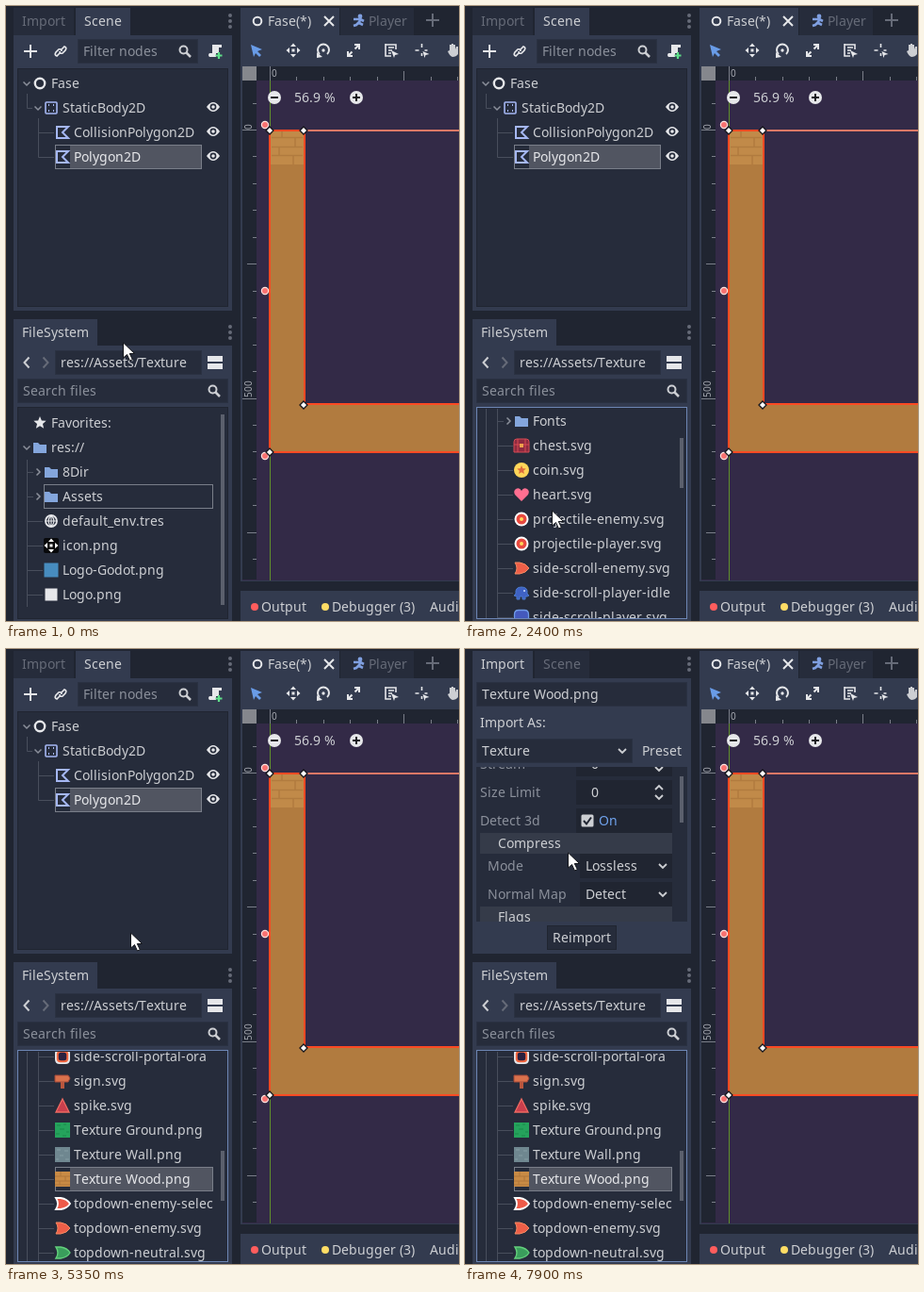
An HTML page with a canvas for the animation above (8000 ms loop, 481 px wide and 652 px high).

```html
<!DOCTYPE html>
<html lang="en">
<head>
<meta charset="utf-8">
<title>Editor: texture import</title>
<style>
html, body { margin: 0; width: 100%; height: 100%; overflow: hidden; background: #202531; }
canvas { display: block; }
</style>
</head>
<body>
<canvas id="stage" width="481" height="652"></canvas>
<script>
const c = document.getElementById('stage').getContext('2d');
const LOOP = 8000, STEP = 50;
const BASE = '#333b4f', DARK = '#262c3b', DEEP = '#202531';
const TEXT = '#cdcfd3', DIM = '#8b909b', FAINT = '#666b78', WHITE = '#e6e7ea';
const BLUE = '#84a6dc', ACCENT = '#699ce8', RED = '#ff4a23', LINE = '#484e5c';
const PICKED = '#515561', FOCUS = '#797e89';

// Drawing helpers
function rect(x, y, w, h, fill, border) {
  if (fill) { c.fillStyle = fill; c.fillRect(x, y, w, h); }
  if (border) { c.strokeStyle = border; c.lineWidth = 1; c.strokeRect(x + .5, y + .5, w - 1, h - 1); }
}
// Glyphs advance by whole pixels, as hinted interface text does.
function text(str, x, y, color = TEXT, size = 14) {
  c.font = `${size}px "Noto Sans", sans-serif`;
  c.fillStyle = color;
  for (const glyph of str) {
    c.fillText(glyph, x, y + Math.round(size * .36));
    x += Math.round(c.measureText(glyph).width);
  }
}
function shape(x, y, d, fill, stroke, width = 1.5) {
  const path = new Path2D(d);
  c.save();
  c.translate(x, y);
  if (fill) { c.fillStyle = fill; c.fill(path); }
  if (stroke) { c.strokeStyle = stroke; c.lineWidth = width; c.stroke(path); }
  c.restore();
}
function clipped(x, y, w, h, draw) {
  c.save();
  c.beginPath();
  c.rect(x, y, w, h);
  c.clip();
  draw();
  c.restore();
}
const ring = (r, x = 0, y = 0) => `M${x + r} ${y}a${r} ${r} 0 1 1 ${-2 * r} 0a${r} ${r} 0 1 1 ${2 * r} 0z`;
const box = (w, h = w, x = -w / 2, y = -h / 2) => `M${x} ${y}h${w}v${h}h${-w}z`;
const round = (s, r) => `M${r - s} ${-s}H${s - r}Q${s} ${-s} ${s} ${r - s}V${s - r}Q${s} ${s} ${s - r} ${s}H${r - s}Q${-s} ${s} ${-s} ${s - r}V${r - s}Q${-s} ${-s} ${r - s} ${-s}z`;
const star = r => 'M' + Array.from({ length: 10 }, (_, i) => {
  const a = i * Math.PI / 5 - Math.PI / 2, q = i % 2 ? r * .45 : r;
  return `${q * Math.cos(a)} ${q * Math.sin(a)}`;
}).join('L') + 'z';

const DOWN = 'M-3.5-1.5L0 2L3.5-1.5', RIGHT = 'M-1.5-3.5L2 0L-1.5 3.5';
const MOVE = 'M0-7.5l3 3.5h-6zM0 7.5l3-3.5h-6zM-7.5 0l3.5-3v6zM7.5 0l-3.5-3v6zM-1.5-1.5h3v3h-3z';
const DART = 'M-7-6H-2Q5-5 8 0Q5 5-2 6H-7Q-3 0-7-6z';
const BLOB = 'M-6 1Q-7-6 0-6Q7-6 6 1L8 3L6 4H4V7H1V4H-2V7H-5V4L-8 3z';
const BRICKS = 'M-8-3h16M-8 2h16M-8 6h16M-2-8v5M3-3v5M-3 2v4';
const portal = color => [[round(8, 5), WHITE], [round(6.2, 4), color], [round(4.2, 2.5), '#2b2140']];

// Each icon is a stack of [path, fill, stroke, width]
const ICONS = {
  folder: [['M-7-5h5l2 2h7v9h-14z', BLUE]],
  star: [[star(7), WHITE]],
  globe: [[ring(6), null, WHITE, 1.8], ['M-6 0h12M0-6v12M0-6Q-6 0 0 6Q6 0 0-6', null, WHITE, 1.1]],
  move: [[round(8, 2), '#08090b'], [MOVE, '#fff']],
  blueMark: [[box(15), '#478cbf']],
  paleMark: [[box(13), WHITE]],
  chest: [['M-8-4Q-8-7-5-7H5Q8-7 8-4V7H-8z', '#8d2a3f', '#d84a55', 1], ['M-8-1H8M-4-7V7M4-7V7', null, '#d84a55', 1], [box(4, 4), '#f0a04c']],
  coin: [[ring(8), '#ffd659'], [star(5), '#dd6a3c']],
  heart: [['M0 7L-7 0Q-9-4-6-6Q-2-8 0-4Q2-8 6-6Q9-4 7 0z', '#ff6f91']],
  shot: [[ring(7.5), '#fff'], [ring(5.5), '#e8493f'], [ring(2), '#ffd659']],
  hero: [[BLOB, '#3f62c4', '#4a7bd0', 1], [ring(1, 3, -2), '#cfe0ff']],
  heroBox: [[round(7.5, 4.5), '#4459bd', '#6f9ae6', 1.3]],
  bluePortal: portal('#3f7ff0'),
  redPortal: portal('#f0623c'),
  sign: [['M-8-6H6L8-3L6 1H-8z', '#d9714c', '#a54a3a', 1], [box(4, 7, -2, 1), '#b9563e']],
  spike: [['M0-7L7 7H-7z', '#c93f4d', '#ef6a62', 1.3]],
  ground: [[box(16), '#25a35c'], ['M-6-5h4M1-6h3M-3-1h5M4 2h3M-7 4h4M0 6h4', null, '#1f9653', 2]],
  wall: [[box(16), '#6f8790'], ['M-6-5h4M2-4h4M-3 1h4M-7 5h3M3 5h4', null, '#7a929a', 2]],
  wood: [[box(16), '#c98b45'], [BRICKS, null, '#b0763a', 1]],
  dartPick: [[DART, '#ee5a48', '#fff', 1.8]],
  dart: [[DART, '#ee5f48', '#f58a63', 1]],
  dartGreen: [[DART, '#3a9e5c', '#63d07c', 1.4]],
  node: [[ring(5.2), null, WHITE, 2.4]],
  body: [[round(6, 1), null, '#a5b7f3', 1.6], ['M-3-3h1M2-3h1M-3 3h1M2 3h1', null, '#a5b7f3', 2]],
  polygon: [['M6-6H-6V6H6L0 0z', null, '#a5b7f3', 2]],
  eye: [['M-7 0Q0-10 7 0Q0 10-7 0z', WHITE], [ring(3.4), DARK], [ring(1.8), WHITE]],
  search: [[ring(4, -1.5, -1.5), null, TEXT, 2], ['M1.5 1.5L6 6', null, TEXT, 2.5]],
  plus: [['M-7 0H7M0-7V7', null, WHITE, 2]],
  link: [['M-1 2L-4 5Q-7 4-5 1L-2-2Q1-3 1 0M1-2L4-5Q7-4 5-1L2 2Q-1 3-1 0', null, WHITE, 1.7]],
  script: [['M-3-7H7V-4H4V2H1V6H-6Q-8 4-6 2H-3z', WHITE], ['M4 1V8M.5 4.5H7.5', null, '#5fe08a', 2.2]],
  layout: [[box(16, 6, -8, -7) + box(16, 6, -8, 1), WHITE]],
  dots: [[ring(2, 0, -6) + ring(2) + ring(2, 0, 6), FAINT]],
  select: [['M-5-6L7-1L2 1L6 5L4 7L0 3L-2 7z', ACCENT]],
  rotate: [['M-4 4A6 6 0 1 1 4 4', null, WHITE, 2], ['M-7 2L-1 7L-7 8z', WHITE], [ring(1.7), WHITE]],
  scale: [['M-6 6L-1.5 1.5M1.5-1.5L6-6M1-6H6V-1M-6 1V6H-1', null, WHITE, 2]],
  list: [['M-6-7V6H0M-6-6H5V-1M-3-3H3M-3 0H1M-3 3H0', null, WHITE, 1.6], ['M0 0L8 4L4 5L3 8z', WHITE]],
  pivot: [['M-7 0H-3M0-7V-3M0 3V6M3 0H6', null, WHITE, 1.6], ['M1 1L8 4L4 5L3 8z', WHITE]],
  hand: [['M-5 1L-3 0V-6h2v5V-7h2v6V-6h2V-1L4-4h2V4Q4 7 0 7Q-3 6-5 1z', TEXT]],
  runner: [[ring(2.4, 2, -5), '#7f9fe0'], ['M-5-2H2L1 2L5 4M1 1L-2 4L-5 5M2-2L6 0', null, '#7f9fe0', 2.6]],
  cross: [['M-5-5L5 5M5-5L-5 5', null, WHITE, 2]],
  minusButton: [[ring(7), WHITE], ['M-4 0H4', null, '#1b1b22', 2]],
  plusButton: [[ring(7), WHITE], ['M-4 0H4M0-4V4', null, '#1b1b22', 2]],
  handle: [['M0-4L4 0L0 4L-4 0z', '#fff', '#16161c', 1.3]],
  knob: [[ring(3.6), '#f87272', '#ffe4e0', 1.2]],
  pointer: [['M.5 1V17L4.5 13.5L7.5 20L10.3 18.7L7.3 12.5H12.5z', '#fff', '#15171c', 1]],
};
function icon(name, x, y) {
  for (const [d, fill, stroke, width] of ICONS[name]) shape(x, y, d, fill, stroke, width);
}

// File rows: [depth, label, icon, arrow]
const asset = (label, name) => [2, label, name];
const HEAD = [[0, 'Favorites:', 'star'], [0, 'res://', 'folder', DOWN], [1, '8Dir', 'folder', RIGHT]];
const CLOSED = [...HEAD, [1, 'Assets', 'folder', RIGHT], [1, 'default_env.tres', 'globe'],
  [1, 'icon.png', 'move'], [1, 'Logo-Godot.png', 'blueMark'], [1, 'Logo.png', 'paleMark']];
const OPEN = [...HEAD, [1, 'Assets', 'folder', DOWN], [2, 'Fonts', 'folder', RIGHT],
  asset('chest.svg', 'chest'), asset('coin.svg', 'coin'), asset('heart.svg', 'heart'),
  asset('projectile-enemy.svg', 'shot'), asset('projectile-player.svg', 'shot'), asset('side-scroll-enemy.svg', 'dart'),
  asset('side-scroll-player-idle', 'hero'), asset('side-scroll-player.svg', 'heroBox'),
  asset('side-scroll-player_idle', 'hero'), asset('side-scroll-player_jum', 'hero'),
  asset('side-scroll-portal-blu', 'bluePortal'), asset('side-scroll-portal-ora', 'redPortal'),
  asset('sign.svg', 'sign'), asset('spike.svg', 'spike'), asset('Texture Ground.png', 'ground'),
  asset('Texture Wall.png', 'wall'), asset('Texture Wood.png', 'wood'), asset('topdown-enemy-selec', 'dartPick'),
  asset('topdown-enemy.svg', 'dart'), asset('topdown-neutral.svg', 'dartGreen')];

// Import rows: [kind, label, y, value, indent]
const OPTIONS = [
  ['spin', 'Stream', 140, '0', 0], ['spin', 'Size Limit', 170, '0', 0], ['check', 'Detect 3d', 200, true, 0],
  ['head', 'Compress', 224], ['pick', 'Mode', 248, 'Lossless', 8], ['pick', 'Normal Map', 278, 'Detect', 8],
  ['head', 'Flags', 302], ['pick', 'Repeat', 326, 'Disabled', 8], ['check', 'Filter', 356, true, 8],
  ['check', 'Mipmaps', 386, false, 8]];

// Timeline
const EXPAND = 1750, PICK = 4350, IMPORT = 6600;
const POINTER = [[0, 124, 356], [100, 124, 356], [250, 156, 395], [350, 162, 430], [550, 95, 500], [750, 27, 522],
  [850, 27, 522], [900, 26, 522], [1000, 26, 522], [1050, 27, 518], [1100, 28, 515], [1700, 28, 515],
  [1750, 90, 530], [2000, 92, 534], [2550, 92, 534], [2600, 93, 535], [3350, 93, 535], [3400, 93, 530],
  [3700, 93, 530], [4150, 115, 557], [4800, 115, 557], [4850, 116, 553], [4950, 116, 553], [5200, 141, 420],
  [5500, 122, 180], [5800, 71, 30], [5850, 68, 28], [5950, 68, 28], [6200, 49, 20], [6900, 49, 20],
  [7050, 42, 75], [7250, 65, 160], [7750, 108, 213], [7850, 108, 213], [7900, 109, 215], [LOOP, 109, 215]];
const FILE_SCROLL = [[0, 0], [2300, 53], [2400, 106], [2450, 160], [2750, 213], [2850, 266], [2900, 292], [3250, 372], [3600, 426]];
const OPTION_SCROLL = [[0, 96], [7600, 76], [7700, 57], [7750, 37], [7900, 18]];

const held = (keys, t) => keys.filter(k => k[0] <= t).pop()[1];
function pointerAt(t) {
  const i = POINTER.findIndex(k => k[0] > t);
  const [t0, x0, y0] = POINTER[i - 1], [t1, x1, y1] = POINTER[i];
  const p = (t - t0) / (t1 - t0);
  return [Math.round(x0 + (x1 - x0) * p), Math.round(y0 + (y1 - y0) * p)];
}

function field(x, y, w, h, label, color = TEXT) {
  rect(x, y, w, h, DARK, '#2a3142');
  if (label) text(label, x + 6, y + h / 2, color);
}

function drawScene() {
  icon('plus', 26, 48);
  icon('link', 58, 48);
  field(76, 35, 128, 26, 'Filter nodes', DIM);
  icon('search', 190, 48);
  icon('script', 222, 48);
  rect(12, 66, 224, 253, DARK, DEEP);
  shape(0, 0, 'M22.5 93V108.5H28M34.5 119V160.5H51M34.5 134.5H51', null, LINE, 1);
  rect(68, 147, 140, 26, PICKED);
  rect(52, 147, 156, 26, null, FOCUS);
  shape(22, 82, DOWN, null, DIM);
  shape(34, 108, DOWN, null, DIM);
  icon('node', 36, 82);
  icon('body', 48, 108);
  icon('polygon', 60, 134);
  icon('polygon', 60, 160);
  text('Fase', 48, 82);
  text('StaticBody2D', 60, 108);
  text('CollisionPolygon2D', 72, 134);
  text('Polygon2D', 72, 160, WHITE);
  for (const y of [108, 134, 160]) icon('eye', 220, y - 1);
}

function drawOption([kind, label, y, value, indent]) {
  if (kind === 'head') {
    rect(16, y - 11, 204, 22, '#353b49');
    text(label, 35, y);
    return;
  }
  const left = 118 + indent / 2;
  if (label === 'Repeat') rect(24, y - 12, 98, 25, '#51555f');
  text(label, 16 + indent, y, DIM);
  rect(left, y - 13, 220 - left, 26, DEEP);
  if (kind === 'check') {
    shape(left + 12, y, round(6.5, 1.5), value ? TEXT : null, value ? null : TEXT, 1.3);
    if (value) shape(left + 12, y, 'M-4 0L-1 3.5L4-3.5', null, DEEP, 2);
    text('On', left + 24, y, value ? '#6fa2ec' : TEXT);
  } else if (kind === 'pick') {
    text(value, 128, y);
    shape(210, y, 'M-4-2L0 2L4-2', null, TEXT, 1.8);
  } else {
    text(value, 134, y);
    shape(206, y, 'M-4-3L0-7L4-3M-4 3L0 7L4 3', null, TEXT, 1.8);
  }
}

function drawImport(scroll) {
  field(12, 35, 224, 26, 'Texture Wood.png');
  text('Import As:', 16, 78);
  field(12, 95, 166, 26, 'Texture');
  shape(167, 108, 'M-4-2L0 2L4-2', null, TEXT, 1.8);
  text('Preset', 188, 108);
  rect(12, 125, 224, 164, DARK);
  clipped(12, 125, 224, 164, () => {
    c.translate(0, -scroll);
    OPTIONS.forEach(drawOption);
  });
  rect(228, Math.round(129.7 + scroll * .295), 4, 49, '#5b606d');
  rect(87, 293, 74, 26, DARK, DEEP);
  text('Reimport', 93, 306);
}

function drawDock(importing, scroll) {
  rect(8, 31, 232, 292, BASE);
  rect(8, 2, 64, 29, importing ? BASE : DARK);
  rect(74, 2, 58, 29, importing ? DARK : BASE);
  text('Import', 17, 16, importing ? TEXT : FAINT);
  text('Scene', 83, 16, importing ? FAINT : TEXT);
  icon('dots', 238, 16);
  importing ? drawImport(scroll) : drawScene();
}

function drawFileRow([depth, label, name, arrow], y, focused, picked) {
  const x = 22 + 12 * depth;
  for (let k = 0; k < depth; k++) rect(22 + 12 * k, y - 13, 1, 26, LINE);
  if (depth) rect(x - 12, y, arrow ? 7 : 17, 1, LINE);
  if (picked) rect(x + 22, y - 13, 198 - x, 26, PICKED);
  if (focused) rect(x + 6, y - 13, 214 - x, 26, null, FOCUS);
  if (arrow) shape(x, y, arrow, null, DIM);
  icon(name, x + 14, y);
  text(label, x + 26, y, picked ? WHITE : TEXT);
}

function drawFiles(t) {
  const open = t >= EXPAND, picked = t >= PICK, scroll = held(FILE_SCROLL, t);
  rect(8, 332, 89, 29, BASE);
  rect(8, 360, 232, 292, BASE);
  text('FileSystem', 17, 346);
  icon('dots', 238, 346);
  shape(22, 378, 'M2.5-5.5L-2.5 0L2.5 5.5', null, TEXT, 2);
  shape(42, 378, 'M-2.5-5.5L2.5 0L-2.5 5.5', null, FAINT, 2);
  field(52, 365, 156, 26, 'res://Assets/Texture');
  icon('layout', 222, 378);
  field(12, 395, 224, 26, 'Search files', DIM);
  icon('search', 221, 408);
  rect(12, 425, 224, 225, DARK);
  clipped(13, 427, 222, 223, () => (open ? OPEN : CLOSED).forEach((row, i) => {
    const focused = row[1] === (picked ? 'Texture Wood.png' : 'Assets');
    drawFileRow(row, 442 + 26 * i - scroll, focused, focused && picked);
  }));
  rect(228, Math.round(433 + scroll * .2325), 4, open ? 53 : 202, '#5b606d');
  rect(12, 425, 224, 225, null, open ? '#6d86b4' : DEEP);
}

function drawRulers() {
  rect(251, 64, 230, 15, DEEP);
  rect(251, 64, 15, 544, DEEP);
  rect(251, 64, 15, 15, '#85878d');
  const unit = 28.45, size = i => i % 10 === 0 ? 15 : i % 5 === 0 ? 10 : 4;
  for (let i = 0; i < 8; i++) {
    const h = size(i);
    rect(Math.round(280 + i * unit), 79 - h, 1, h, '#7a7e89');
  }
  for (let i = -1; i < 17; i++) {
    const w = size(i);
    rect(266 - w, Math.round(131 + i * unit), w, 1, '#7a7e89');
  }
  text('0', 282, 71, '#a3a6ae', 10);
  for (const [label, y] of [['0', 131], ['500', 415]]) {
    c.save();
    c.translate(257, y);
    c.rotate(-Math.PI / 2);
    text(label, 0, 0, '#a3a6ae', 10);
    c.restore();
  }
}

function drawViewport() {
  rect(249, 2, 105, 29, BASE);
  rect(355, 2, 78, 29, DARK);
  rect(249, 31, 232, 579, BASE);
  shape(267, 16, ring(4.3), null, WHITE, 2);
  text('Fase(*)', 278, 16);
  icon('cross', 343, 16);
  icon('runner', 374, 16);
  text('Player', 385, 16, FAINT);
  shape(453, 15, 'M-7 0H7M0-7V7', null, FAINT, 2);

  icon('select', 265, 47);
  shape(305, 47, MOVE, WHITE);
  ['rotate', 'scale'].forEach((name, i) => icon(name, 337 + 32 * i, 47));
  ['list', 'pivot', 'hand'].forEach((name, i) => icon(name, 409 + 32.5 * i, 47));

  rect(251, 64, 230, 545, '#332a47');
  drawRulers();
  rect(280, 79, 1, 530, '#60902c');
  const walls = 'M317 132V422H490V473H280V132z';
  shape(0, 0, walls, '#b17b3f');
  rect(281, 133, 35, 35, '#c18a49');
  shape(0, 0, 'M282 139.5H315M282 149.5H315M282 158.5H315M293 133V139M307 139V149M290 149V158M305 158V168', null, '#b17b3f', 1.5);
  rect(317, 131, 164, 2, '#dc7866');
  shape(0, 0, walls, null, RED, 2);
  for (const y of [126, 302, 477]) icon('knob', 275, y);
  for (const [x, y] of [[280, 132], [316, 132], [316, 423], [280, 473]]) icon('handle', x, y);

  icon('minusButton', 285, 97);
  text('56.9 %', 306, 97);
  icon('plusButton', 372, 97);

  rect(249, 620, 232, 32, BASE);
  shape(264, 637, ring(4), '#ff5d5d');
  text('Output', 271, 637);
  shape(339, 637, ring(4), '#ffdd65');
  text('Debugger (3)', 346, 637);
  text('Audio', 450, 637);
}

function render(now) {
  const t = Math.floor(now % LOOP / STEP) * STEP;
  rect(0, 0, 481, 652, DEEP);
  drawDock(t >= IMPORT, held(OPTION_SCROLL, t));
  drawFiles(t);
  drawViewport();
  icon('pointer', ...pointerAt(t));
}

const start = performance.now();
(function tick() {
  render(performance.now() - start);
  requestAnimationFrame(tick);
})();
</script>
</body>
</html>
```
